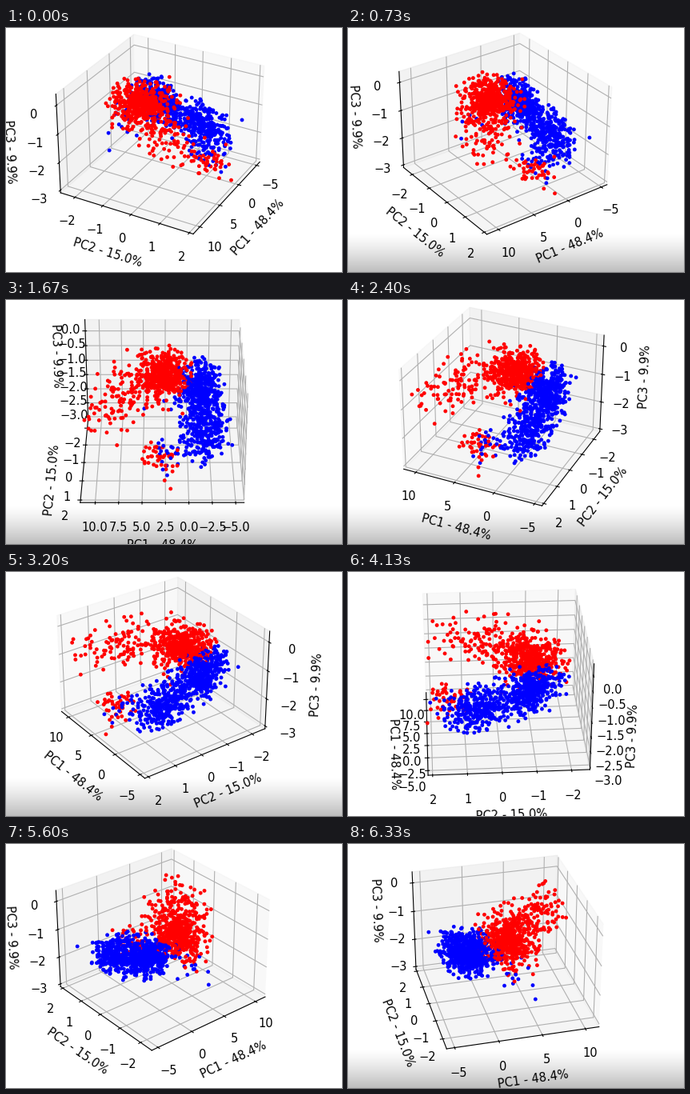
A matplotlib script for the animation above (6390 ms loop, 420 px wide and 305 px high).

```python
import numpy as np
import matplotlib.pyplot as plt
from matplotlib.animation import FuncAnimation
from matplotlib.ticker import MultipleLocator

W, H = 420, 305
STEP_MS, FRAMES = 45, 142
START_AZIM, TURN = 28.79, 3.6
SPREAD = np.array([1.15, 0.42, 0.29])

plt.rcParams["font.family"] = "DejaVu Sans"
plt.rcParams["font.size"] = 10.5
rng = np.random.default_rng(7)


def cloud(n, centre, size=1.0):
    """Gaussian blob without far outliers; centre may be one point per row."""
    noise = np.clip(rng.normal(size=(n, 3)), -2.4, 2.4)
    return np.asarray(centre) + noise * SPREAD * size


def blue_points():
    # two lumps joined along a sloping line
    band = np.vstack([cloud(400, (-1.3, -0.85, -1.41)),
                      cloud(290, (-1.8, 0.6, -1.41))])
    band[:, 2] -= 0.345 * band[:, 1]
    stray = cloud(14, (2.5, -1.5, -1.65))
    front = cloud(24, (1.8, 1.2, -1.95), 0.8)
    return np.vstack([band, stray, front])


def red_points():
    dense = cloud(440, (2.7, -1.0, -0.7), 1.1)
    dense[:, 1] += 0.25 * (dense[:, 2] + 0.7)
    t = rng.uniform(0, 1, (140, 1))
    start, end = np.array([4, -0.8, -0.5]), np.array([9.5, 1.3, -0.8])
    tail = cloud(140, start + (end - start) * t, 1.15)
    front = cloud(42, (3.1, 1.4, -2.1), 0.8)
    return np.vstack([dense, tail, front])


blue, red = blue_points(), red_points()
points = np.vstack([blue, red])
colors = ["blue"] * len(blue) + ["red"] * len(red)

fig = plt.figure(figsize=(W / 100, H / 100), dpi=100, facecolor="white")
ax = fig.add_axes([0, 0, 1, 1], projection="3d")
ax.scatter(*points.T, c=colors, s=12, linewidths=0, depthshade=False)
ax.set(xlim=(-5.9, 11.6), ylim=(-2.53, 2.13), zlim=(-3.1, 0.38),
       xlabel="PC1 - 48.4%", ylabel="PC2 - 15.0%", zlabel="PC3 - 9.9%")
ax.yaxis.set_major_locator(MultipleLocator(1))

# dark fade along the bottom edge
FADE_H = 50
shade = np.zeros((FADE_H, 1, 4))
shade[:, 0, 3] = 0.26 * np.linspace(0, 1, FADE_H) ** 1.3
fade_ax = fig.add_axes([0, 0, 1, FADE_H / H], zorder=10)
fade_ax.axis("off")
fade = fade_ax.imshow(shade, aspect="auto", interpolation="bilinear")


def turn_count(ms):
    """Turns made so far: two per three ticks of a 15 Hz clock."""
    tick = int((ms + 4) * 0.015)
    late = 1 if 22 <= tick <= 29 else 2
    return 2 * (tick // 3) + (tick % 3 >= late)


def ramp(n, start, length):
    return min(max((n - start) / length, 0), 1)


def place_axes(azim):
    """The wider the turned box, the smaller the plot; its top stays put."""
    a = np.radians(azim)
    width = abs(np.sin(a)) + abs(np.cos(a))
    side = 309 - 50 * (width - 1)
    left = 195.2 - 0.5135 * side
    ax.set_position([left / W, 1 - (side - 14.8) / H, side / W, side / H])


def update(i):
    n = turn_count(i * STEP_MS + STEP_MS - 1)
    azim = START_AZIM + TURN * n
    ax.view_init(elev=30, azim=azim)
    place_axes(azim)

    # finer ticks while the box is seen nearly face on
    fine = abs((azim + 45) % 90 - 45) < 8
    ax.xaxis.set_major_locator(MultipleLocator(2.5 if fine else 5))
    ax.zaxis.set_major_locator(MultipleLocator(0.5 if fine else 1))

    fade.set_alpha(ramp(n, 3, 2) - ramp(n, 33, 7) + ramp(n, 58, 2))
    return []


anim = FuncAnimation(fig, update, frames=FRAMES, interval=STEP_MS,
                     init_func=lambda: update(0), repeat=True, repeat_delay=0)
plt.show()
```
